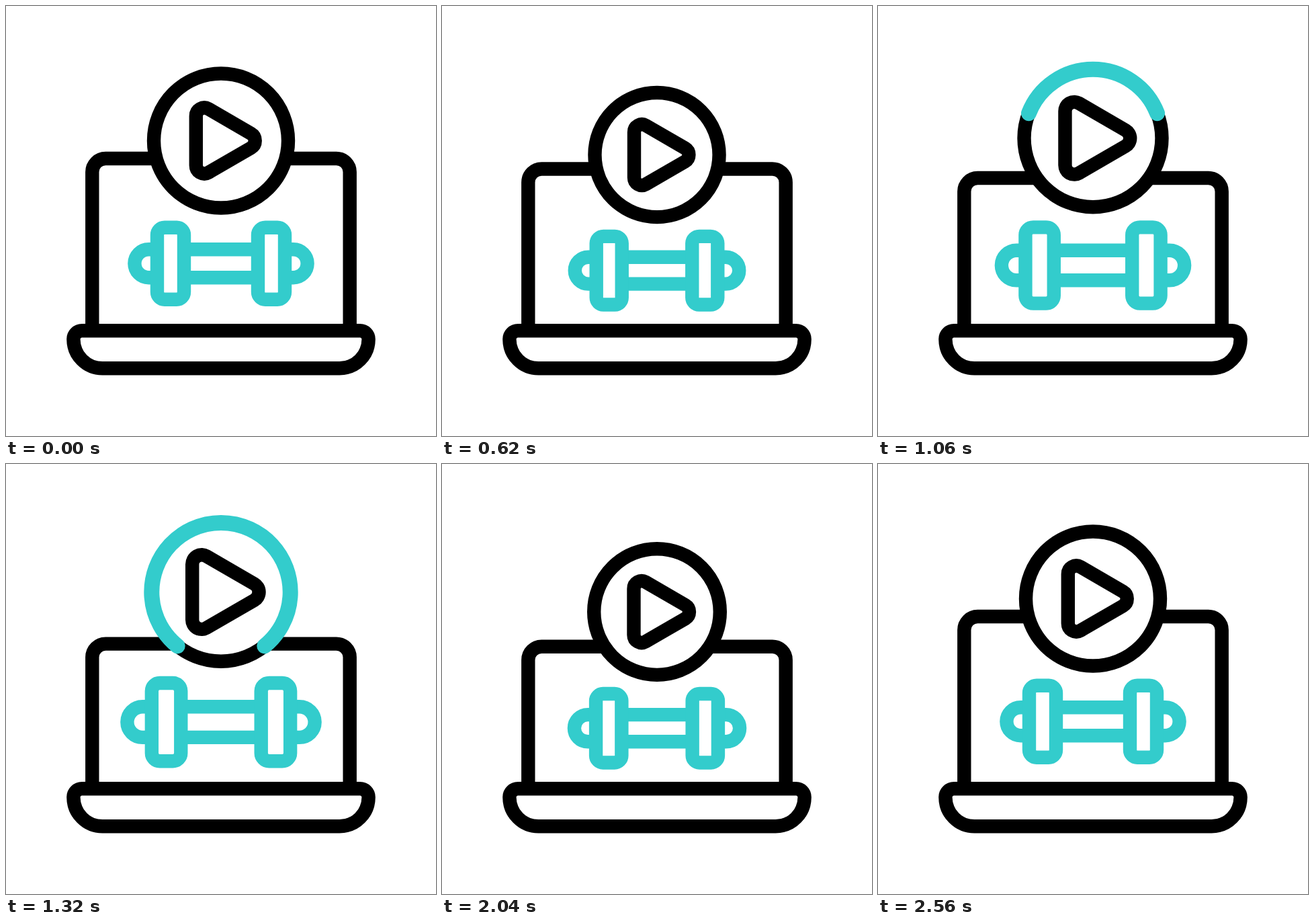
These frames come from a looping animation (640 by 640 pixels, 2780 ms). An HTML page:

```html
<!DOCTYPE html>
<html lang="en">
<head>
<meta charset="utf-8">
<title>Online workout</title>
<style>
  html, body { margin: 0; width: 100%; height: 100%; overflow: hidden; background: #fff; }
  svg { display: block; width: 100vw; height: 100vh; }
  svg * { vector-effect: non-scaling-stroke; }
</style>
</head>
<body>
<svg viewBox="0 0 640 640" fill="none" stroke="#000" stroke-width="20.4">
  <path id="screen"/>
  <path d="M113 483.3H527A12.6 12.6 0 0 1 539.6 496A43.2 43.2 0 0 1 496.4 539.3H143.6A43.2 43.2 0 0 1 100.4 496A12.6 12.6 0 0 1 113 483.3Z"/>
  <g id="bell" stroke="#33cccc">
    <path d="M-55 -21H55M-55 21H55"/>
    <path d="M-95 -21H-107.6a21 21 0 0 0 0 42H-95M95 -21H107.6a21 21 0 0 1 0 42H95"/>
    <rect x="-95" y="-53.5" width="40" height="107" rx="11"/>
    <rect x="55" y="-53.5" width="40" height="107" rx="11"/>
  </g>
  <circle id="disc" cx="320" fill="#fff"/>
  <path id="arc" stroke="#33cccc" stroke-width="23" stroke-linecap="round"/>
  <path id="play" d="M-43.2 -36.6A12.4 12.4 0 0 1 -24.6 -47.3L38.6 -10.7A12.4 12.4 0 0 1 38.6 10.7L-24.6 47.3A12.4 12.4 0 0 1 -43.2 36.6Z"/>
</svg>
<script>
const LOOP = 2780, STEP = 20;
// Moments of the jump: crouch, leap, hang, crouch again, stand still.
const BEGIN = 200, LEAP = 480, FALL = 1840, LAND = 2158, END = 2560;

const el = id => document.getElementById(id);
const screenLine = el('screen'), bell = el('bell'), disc = el('disc'), arc = el('arc'), play = el('play');

const part = (t, a, b) => Math.min(1, Math.max(0, (t - a) / (b - a)));
const inOut = (t, a, b) => { const u = part(t, a, b); return u * u * (3 - 2 * u); };
const out = (t, a, b, power = 3) => 1 - (1 - part(t, a, b)) ** power;
const bump = (t, a, b) => Math.sin(Math.PI * part(t, a, b)) ** 2;

// rest -> low -> high -> low -> rest
const jump = (t, rest, low, high, settle = 3) => rest
  + (low - rest) * (inOut(t, BEGIN, LEAP) - out(t, LAND, END, settle))
  + (high - low) * (out(t, LEAP, FALL) - inOut(t, FALL, LAND));

function draw(t) {
  const press = inOut(t, BEGIN, 555) - inOut(t, 555, 800) + inOut(t, FALL, LAND) - inOut(t, LAND, END);
  const size = 1 - 0.09 * press, pulse = bump(t, 760, 1700);
  const y = jump(t, 200.5, 234.5, 188), r = 100 * size + 3.5 * pulse;

  const top = 227 + 37 * (inOut(t, BEGIN, 463) - inOut(t, 463, 746))
    + 45.5 * (out(t, 746, FALL) - inOut(t, 1995, END));
  screenLine.setAttribute('d',
    `M128.3 483V${top + 20}a20 20 0 0 1 20 -20H491.7a20 20 0 0 1 20 20V483`);

  bell.setAttribute('transform',
    `translate(320 ${jump(t, 383.2, 397.7, 383.3)}) scale(${jump(t, 1, 0.894, 1.097, 2)})`);
  disc.setAttribute('cy', y);
  disc.setAttribute('r', r);
  play.setAttribute('transform', `translate(326 ${y}) scale(${size + 0.142 * pulse})`);

  // Coloured ring spreads from the top down both sides, then draws back.
  const a = 0.999 * Math.PI * bump(t, 935, 1524);
  const dx = r * Math.sin(a), ey = y - r * Math.cos(a);
  arc.setAttribute('d', a > 0.01
    ? `M${320 - dx} ${ey}A${r} ${r} 0 ${a > Math.PI / 2 ? 1 : 0} 1 ${320 + dx} ${ey}` : '');
}

const start = performance.now();
function tick() {
  const t = (performance.now() - start) % LOOP;
  draw(Math.floor(t / STEP) * STEP);
  requestAnimationFrame(tick);
}
draw(0);
requestAnimationFrame(tick);
</script>
</body>
</html>
```
